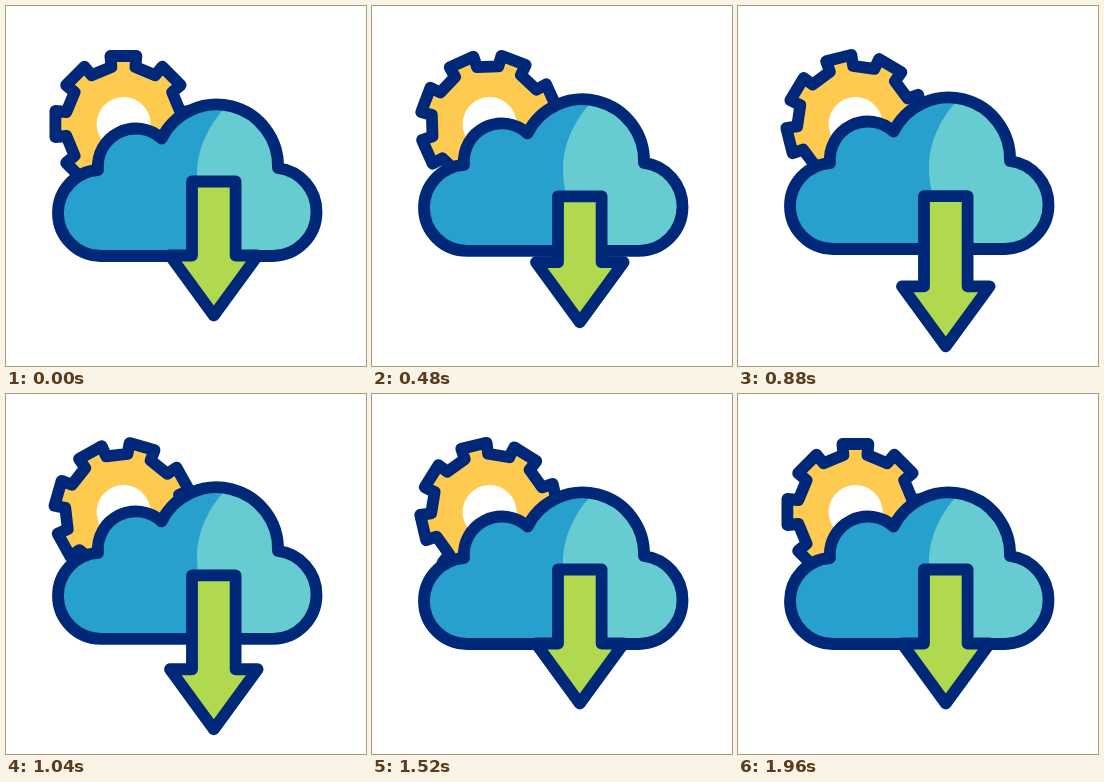
These frames come from a looping animation (360x360 px, 2000 ms). An HTML page:

```html
<!DOCTYPE html>
<html lang="en">
<head>
<meta charset="utf-8">
<title>Cloud download</title>
<style>
html, body { margin: 0; width: 100%; height: 100%; overflow: hidden; background: #fff; }
svg { display: block; width: 100vw; height: 100vh; }
.line { stroke: #002878; stroke-width: 11.8; stroke-linejoin: round; }
</style>
</head>
<body>
<svg viewBox="0 0 360 360">
  <path id="gear" class="line" fill="#ffca50"/>
  <circle cx="117.6" cy="118" r="27" fill="#fff"/>
  <g id="cloud">
    <path id="body" fill="#28a0ce"/>
    <path id="light" fill="#67ccd1"/>
    <path id="rim" class="line" fill="none"/>
  </g>
  <path id="arrow" class="line" fill="#b1d94f"/>
</svg>
<script>
const LOOP = 2000, STEP = 40, START = 40;
const $ = id => document.getElementById(id);

const easeIn = u => u * u;
const easeInOut = u => u < 0.5 ? 2 * u * u : 1 - 2 * (1 - u) ** 2;
const progress = (t, from, to) => Math.min(1, Math.max(0, (t - from) / (to - from)));

// Rises from 0 to 1 at the peak, then eases back to 0
function pulse(t, from, peak, to, rise = easeInOut) {
  return t < peak ? rise(progress(t, from, peak)) : 1 - easeInOut(progress(t, peak, to));
}

function gearPath(teeth) {
  const tooth = [[-12, -57], [-13, -68], [13, -68], [12, -57]];
  const points = [];
  for (let i = 0; i < teeth; i++) {
    const a = i * 2 * Math.PI / teeth, c = Math.cos(a), s = Math.sin(a);
    for (const [x, y] of tooth) points.push(`${x * c - y * s} ${x * s + y * c}`);
  }
  return `M${points.join("L")}Z`;
}

const arc = (r, x, y, sweep = 1) => `A${r} ${r} 0 0 ${sweep} ${x} ${y}`;
const cloudPath = "M95 250" + arc(43, 52, 207) + arc(43, 92, 164) + arc(38, 155.5, 132.5) +
  arc(61.5, 272, 162) + arc(44, 310.5, 206) + arc(44, 267, 250) + "Z";
const lightPath = "M222 99C208 112 191 138 191 168C191 200 205 230 226 250H267" +
  arc(44, 310.5, 206, 0) + arc(44, 272, 162, 0) + arc(61.5, 222, 99, 0) + "Z";

$("gear").setAttribute("d", gearPath(8));
$("body").setAttribute("d", cloudPath);
$("rim").setAttribute("d", cloudPath);
$("light").setAttribute("d", lightPath);

function draw(t) {
  const turn = 180 * easeInOut(progress(t, START, 1870));
  const lift = 7.4 * pulse(t, START, 760, 1480);
  const top = 175.5 + 18.7 * pulse(t, START, 690, 1270);
  const y = 249.5 + 31.7 * pulse(t, 130, 890, 1380, easeIn);
  $("gear").setAttribute("transform", `translate(117.4 118) rotate(${turn})`);
  $("cloud").setAttribute("transform", `translate(0 ${-lift})`);
  $("arrow").setAttribute("d",
    `M186 ${top}H229.6V${y}H251.6L207.8 ${y + 60}L164 ${y}H186Z`);
}

const start = performance.now();
function tick() {
  const t = (performance.now() - start) % LOOP;
  draw(Math.floor(t / STEP) * STEP);
  requestAnimationFrame(tick);
}
tick();
</script>
</body>
</html>
```
